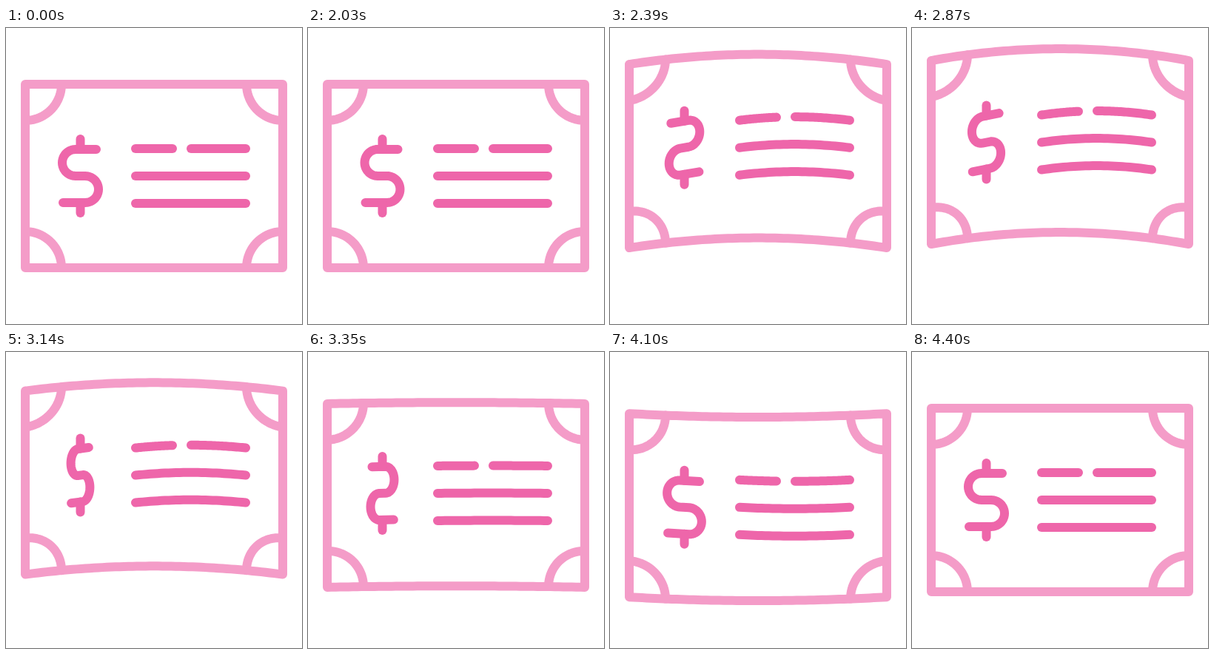
Animation, 400 px wide and 400 px high, one loop 4.43 s. Source, as an HTML page with a canvas:

```html
<!DOCTYPE html>
<html lang="en">
<head>
<meta charset="utf-8">
<title>Waving banknote</title>
<style>
  html, body { margin: 0; width: 100%; height: 100%; overflow: hidden; background: #fff; }
  canvas { display: block; width: 400px; height: 400px; }
</style>
</head>
<body>
<canvas id="stage" width="400" height="400"></canvas>
<script>
const ctx = document.getElementById('stage').getContext('2d');
const LOOP = 4430, LIGHT = '#f49cc8', DARK = '#ee66aa';
const L = 26, R = 374, T = 76, B = 324, RADIUS = 49, SIGN_X = 100.5;

const bezier = (x1, y1, x2, y2) => x => {
  const at = (a, b, s) => 3 * a * s * (1 - s) ** 2 + 3 * b * s * s * (1 - s) + s ** 3;
  let lo = 0, hi = 1;
  for (let i = 0; i < 24; i++) {
    const mid = (lo + hi) / 2;
    if (at(x1, x2, mid) < x) lo = mid; else hi = mid;
  }
  return at(y1, y2, lo);
};
const sine = u => (1 - Math.cos(Math.PI * u)) / 2;

// Vertical offsets: note edge, note middle, print, bulge of the printed lines
const REST = [0, 0, 0, 0], UP = [-32, -48, -45.5, -5.5], DOWN = [13.7, 23, 18.8, 3.6];
const STEPS = [
  [2030, 2720, REST, UP, bezier(.25, .2, .25, 1)],
  [2850, 3820, UP, DOWN, bezier(.45, 0, .5, 1)],
  [3820, 4400, DOWN, REST, sine]
];

function offsets(t) {
  let pose = REST;
  for (const [start, end, from, to, ease] of STEPS) {
    if (t < start) break;
    const k = t >= end ? 1 : ease((t - start) / (end - start));
    pose = from.map((v, i) => v + (to[i] - v) * k);
  }
  return pose;
}

// Two turns of the dollar sign, slowing down at the end
function spin(t) {
  if (t < 2030 || t >= 4400) return 0;
  const s = t - 2000;
  if (s < 1740) return .385 * s - 1.615e-5 * s * s;
  return 621 + 99 * (1 - (1 - (s - 1740) / 660) ** 2.19);
}

function line(x1, y1, x2, y2, n = 30) {
  return Array.from({ length: n + 1 }, (_, i) => [x1 + (x2 - x1) * i / n, y1 + (y2 - y1) * i / n]);
}

function arc(cx, cy, r, from, to, n = 24) {
  return Array.from({ length: n + 1 }, (_, i) => {
    const a = (from + (to - from) * i / n) * Math.PI / 180;
    return [cx + r * Math.cos(a), cy + r * Math.sin(a)];
  });
}

const corners = [
  arc(L, T, RADIUS, 0, 90), arc(R, T, RADIUS, 90, 180),
  arc(R, B, RADIUS, 180, 270), arc(L, B, RADIUS, 270, 360)
];
const border = [...line(L, T, R, T, 60), ...line(R, B, L, B, 60), [L, T]];
const rows = [
  line(175, 163, 225, 163), line(250, 163, 324, 163),
  line(175, 200, 324, 200), line(175, 237, 324, 237)
];
const sign = [
  [[122, 164], ...arc(94, 182, 18, 270, 90), ...arc(107, 218, 18, -90, 90), [77, 236]],
  [[SIGN_X, 150], [SIGN_X, 164]],
  [[SIGN_X, 236], [SIGN_X, 250]]
];

function stroke(paths, color, warp) {
  ctx.strokeStyle = color;
  for (const path of paths) {
    ctx.beginPath();
    for (const p of path) ctx.lineTo(...warp(...p));
    ctx.stroke();
  }
}

function draw(t) {
  const [edge, middle, shift, bulge] = offsets(t);
  const bend = middle - edge;
  const turn = Math.cos(spin(t) * Math.PI / 180);
  ctx.fillStyle = '#fff';
  ctx.fillRect(0, 0, 400, 400);
  ctx.lineWidth = 12;
  ctx.lineCap = ctx.lineJoin = 'round';

  stroke([...corners, border], LIGHT,
    (x, y) => [x, y + edge + bend * (1 - ((x - 200) / 174) ** 2)]);
  stroke(rows, DARK,
    (x, y) => [x, y + shift + bulge * (1 - ((x - 249.5) / 74.5) ** 2)]);
  stroke(sign, DARK, (x, y) => {
    const dx = (x - SIGN_X) * turn;
    return [SIGN_X + dx, y + shift + dx * bend * .0125];
  });
}

function tick() {
  draw(performance.now() % LOOP);
  requestAnimationFrame(tick);
}
tick();
</script>
</body>
</html>
```
